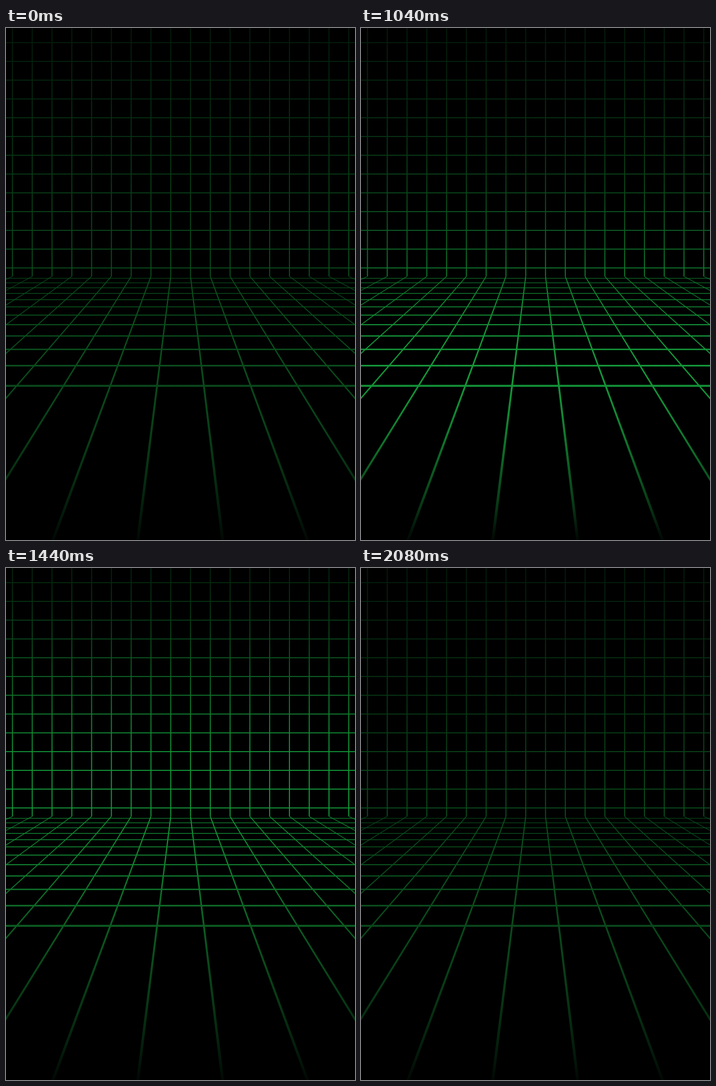
Write an HTML page with a canvas that moves like this. It is 618 by 906 pixels and loops after 2.48 s.

```html
<!DOCTYPE html>
<html lang="en">
<head>
<meta charset="utf-8">
<title>Grid pulse</title>
<style>
html, body { margin: 0; width: 100%; height: 100%; overflow: hidden; background: #000; }
canvas { display: block; }
</style>
</head>
<body>
<canvas id="stage" width="618" height="906"></canvas>
<script>
const W = 618, H = 906, LOOP = 2480, STEP = 80;
const PULSE_START = 480, PULSE_END = 2080;
const ctx = document.getElementById('stage').getContext('2d');

// Geometry: a flat wall meets a floor that recedes to a vanishing point.
const CX = 309.2, GAP = 35.03, ROW = 33.22, EDGE = 439.5, SLOPE = 0.00705;
const VANISH_Y = EDGE - 1 / SLOPE;

// Resting light grows down the wall and dies away across the floor.
function restLight(y) {
  return y < EDGE
    ? 26 + 54 * y / EDGE
    : 80 - 72 * ((y - EDGE) / (H - EDGE)) ** 2.7;
}

// A soft band of light travels from the floor's near edge up the wall.
function pulseLight(y, t) {
  const u = Math.min(1, Math.max(0, (t - PULSE_START) / (PULSE_END - PULSE_START)));
  const power = 88 * Math.sin(Math.PI * u) ** 1.3;
  const centre = 900 - 980 * u ** 1.15;
  const fade = Math.min(1, (H - y) / 60);
  return fade * power * Math.exp(-(((y - centre) / 230) ** 2));
}

function lineFill(t) {
  const fill = ctx.createLinearGradient(0, 0, 0, H);
  const stops = 48;
  for (let i = 0; i <= stops; i++) {
    const y = H * i / stops;
    const g = restLight(y) + pulseLight(y, t);
    fill.addColorStop(i / stops, `rgb(${g * 0.13}, ${g}, ${g * 0.38})`);
  }
  return fill;
}

function hLine(y, w) {
  ctx.fillRect(0, y - w / 2, W, w);
}

function floorLine(offset) {
  const x0 = CX + offset;
  const x1 = CX - 0.7 + offset * (1 + (H - EDGE) * SLOPE);
  ctx.beginPath();
  ctx.moveTo(x0 - 0.9, EDGE);
  ctx.lineTo(x0 + 0.9, EDGE);
  ctx.lineTo(x1 + 2.6, H);
  ctx.lineTo(x1 - 2.6, H);
  ctx.fill();
}

function draw(t) {
  ctx.fillStyle = '#000';
  ctx.fillRect(0, 0, W, H);
  ctx.fillStyle = lineFill(t);
  for (let i = 0; i < 13; i++) hLine(25.9 + i * ROW, 1.75);
  for (let i = 0; i < 12; i++) {
    const depth = 1000 / (6.88 - i * 0.3545);
    hLine(VANISH_Y + depth, 3.4 * (depth / 335) ** 1.5);
  }
  for (let i = -8.5; i <= 8.5; i++) {
    ctx.fillRect(CX + i * GAP - 0.9, 0, 1.8, EDGE);
    floorLine(i * GAP);
  }
}

let shown = -1;
function tick() {
  const t = Math.floor(performance.now() % LOOP / STEP) * STEP;
  if (t !== shown) draw(shown = t);
  requestAnimationFrame(tick);
}
tick();
</script>
</body>
</html>
```
